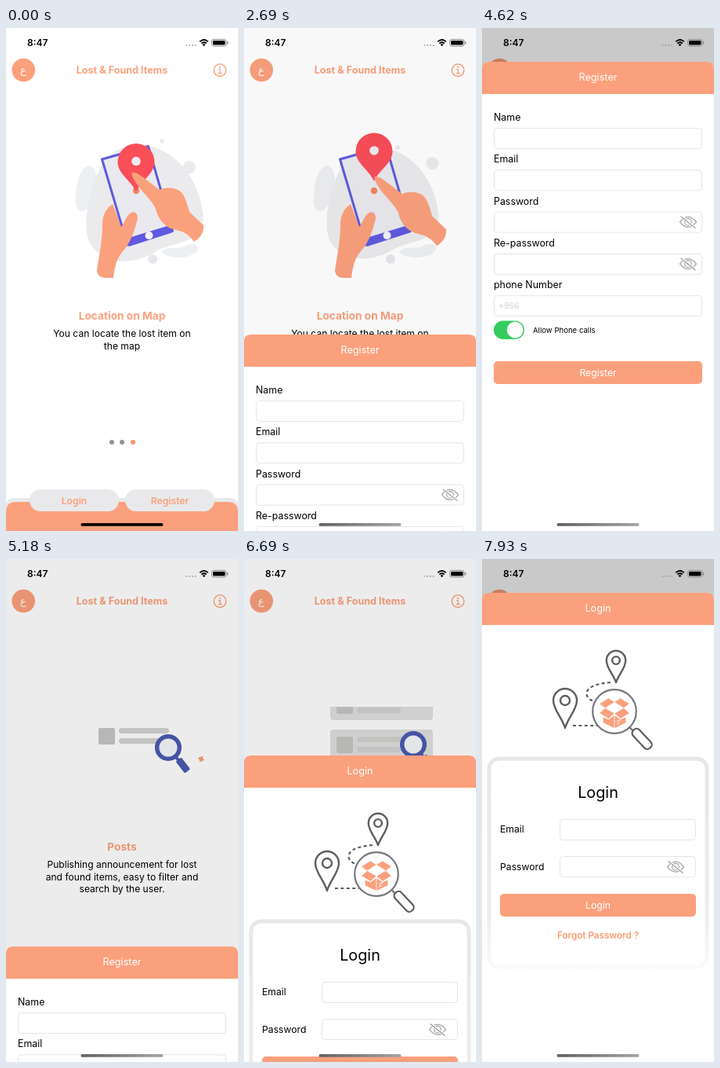
Recreate the animation shown at these times as an HTML page. Size 296 by 640 pixels, loop 8 s.

```html
<!DOCTYPE html>
<html lang="en">
<head>
<meta charset="utf-8">
<title>Lost &amp; Found Items</title>
<style>
html, body { margin: 0; width: 100%; height: 100%; overflow: hidden; background: #fff; }
svg { display: block; width: 296px; height: 640px; }
text { font-family: Inter, "Noto Sans", sans-serif; }
</style>
</head>
<body>
<svg id="stage" viewBox="0 0 296 640" xmlns="http://www.w3.org/2000/svg"></svg>
<script>
const LOOP = 8000, TOP = 43, TRAVEL = 597;
const ORANGE = '#fba07c', GREY = '#ebebed', LINE = '#e6e6e6', INK = '#5d5e62';
const stage = document.getElementById('stage');

// Drawing helpers
const attrs = o => Object.entries(o).map(([k, v]) => ` ${k}="${v}"`).join('');
const label = (s, x, y, size, fill = '#000', o = {}) =>
  `<text x="${x}" y="${y}" font-size="${size}" fill="${fill}"${attrs(o)}>${s}</text>`;
const centred = (s, x, y, size, fill, weight = 400) =>
  label(s, x, y, size, fill, { 'text-anchor': 'middle', 'font-weight': weight });
const box = (x, y, w, h, r, fill, o = {}) =>
  `<rect x="${x}" y="${y}" width="${w}" height="${h}" rx="${r}" fill="${fill}"${attrs(o)}/>`;
const disc = (x, y, r, fill, o = {}) => `<circle cx="${x}" cy="${y}" r="${r}" fill="${fill}"${attrs(o)}/>`;
const shape = (d, fill, o = {}) => `<path d="${d}" fill="${fill}"${attrs(o)}/>`;
const stroke = (d, color, width, o = {}) =>
  shape(d, 'none', { stroke: color, 'stroke-width': width, 'stroke-linecap': 'round', ...o });
const group = (id, body, o = {}) => `<g id="${id}"${attrs(o)}>${body}</g>`;
const field = (x, y, w) => box(x + .5, y + .5, w - 1, 26, 4, '#fff', { stroke: LINE });
const button = (s, x, y, w) => box(x, y, w, 29, 5, ORANGE) + centred(s, 148, y + 19, 12.2, '#fff');

const eye = (x, y) => `<g transform="translate(${x} ${y})">` +
  stroke('M-10.5 0Q0-13 10.5 0Q0 13-10.5 0Z', '#a2a2a2', 1.2) +
  disc(0, 0, 4.3, 'none', { stroke: '#a2a2a2', 'stroke-width': 1.2 }) +
  disc(0, 0, 1.6, '#a2a2a2') +
  stroke('M-8.5-7L9 7.5', '#fff', 3) + stroke('M-9-7L9 7.5', '#999', 1.2) + '</g>';

function statusBar() {
  const dots = [230.5, 234.3, 238, 241.7].map(x => disc(x, 22, 1, '#a5a5a8')).join('');
  const wifi = stroke('M247.2 17.4Q252.5 12.6 257.8 17.4M249.2 19.7Q252.5 16.8 255.8 19.7', '#000', 1.7,
    { 'stroke-linecap': 'butt' }) + shape('M252.5 23.2l-2-2.2q2-1.6 4 0z', '#000');
  const battery = box(262.5, 14.5, 18.5, 8.6, 2.6, 'none', { stroke: '#8b8b8d' }) +
    box(264, 16, 15.5, 5.6, 1.4, '#000') + box(282, 17, 1.3, 3.6, .6, '#8b8b8d');
  return label('8:47', 27, 23, 12, '#000', { 'font-weight': 600 }) + dots + wifi + battery;
}

function mapArt() {
  const blob = 'M110 205C120 168 138 149 168 149C212 148 246 190 251 234C256 276 218 270 192 284' +
    'C160 304 122 300 107 274C99 258 102 228 110 205Z';
  const phone = shape('M122.5 167L181.5 150.5L212.5 258L155 276Z', '#e9e9ef',
    { stroke: '#5f5adf', 'stroke-width': 3, 'stroke-linejoin': 'round' }) +
    shape('M153 268L209 251L213 260L157 278Z', '#5f5adf') + disc(182.5, 264, 5, '#f3f3f8');
  const leftHand = shape('M136 224C126 231 123 240 123 250C123 272 118 294 116 309Q117 318 128 318L137 318' +
    'C139 302 141 294 149 284C160 273 165 254 168 242C168 234 162 232 157 237C152 242 150 250 147 253Z', ORANGE);
  const pin = shape('M0 38C-6 24-23.5 15-23.5 0A23.5 23.5 0 0 1 23.5 0C23.5 15 6 24 0 38Z', '#fa4e59') +
    disc(0, -1, 5.8, '#ecebee');
  const rightHand = shape('M160.5 184C166 183 170 187 175 190L196 206C202 203 210 203 217 205' +
    'C227 208 230 220 234 234L252 251Q253 264 240 272C234 264 228 259 217 257C204 255 194 244 191 230' +
    'C188 223 182 217 176 210C170 203 160 192 160.5 184Z', ORANGE);
  return shape('M107 175C92 176 88 205 89 222C91 240 104 234 110 221C117 204 119 178 107 175Z', '#edf0f3') +
    shape('M198 285C205 275 220 284 230 276C239 274 246 274 245 282C239 294 207 295 198 285Z', '#edf0f3') +
    group('blob', shape(blob, GREY)) + disc(187, 294, 6, '#e6e7eb') +
    group('bigDot', disc(234, 177, 8, GREY)) + group('smallDot', disc(199, 144, 3, GREY)) +
    phone + leftHand + disc(166, 207, 4.2, '#f4865f') + group('pin', pin) + group('hand', rightHand);
}

function postCard(i) {
  return group('card' + i,
    box(110, 0, 131, 38, 4, '#e0e0e0', { class: 'plate' }) + box(118, 9, 21, 21, 2, '#c6c6c5') +
    box(144, 9, 64, 7, 3.5, '#d3d4d1', { class: 'bar' }) + box(144, 22, 56, 7, 3.5, '#d3d4d1'));
}

function postsArt() {
  const spark = id => group(id, box(-4, -1.6, 8, 3.2, .5, ORANGE) + box(-1.6, -4, 3.2, 8, .5, ORANGE));
  const lens = stroke('M9 11L13 16', '#4a5bb0', 4) +
    box(-4.5, 0, 9, 19, 2, '#4a5bb0', { transform: 'translate(13 15) rotate(-38)' }) +
    disc(0, 0, 14.3, '#f6f7fb', { stroke: '#4a5bb0', 'stroke-width': 5.5 });
  return `<g clip-path="url(#listClip)">${[0, 1, 2].map(postCard).join('')}</g>` +
    group('lens', lens) + spark('sparkR') + spark('sparkL');
}

const pageText = (title, lines) => centred(title, 148, 371, 13.7, ORANGE, 700) +
  lines.map((s, i) => centred(s, 148, 393 + i * 15.7, 12.1, '#000')).join('');

const pager = active => [135, 148, 162].map((x, i) =>
  disc(x, 527, 3, i === active ? '#fb9468' : '#929296')).join('');

function home() {
  const pill = (s, x) => box(x, 587, 114, 28, 14, '#e9e9eb') + centred(s, x + 57, 605.5, 12.2, ORANGE, 600);
  return box(0, 0, 296, 640, 0, '#fff') + disc(22.3, 53.5, 14.8, ORANGE) +
    label('ع', 22, 58, 13, '#fff', { 'text-anchor': 'middle', style: 'font-family:"DejaVu Sans",sans-serif' }) +
    centred('Lost &amp; Found Items', 148, 58, 12.6, ORANGE, 700) +
    disc(273, 53.7, 7.8, 'none', { stroke: ORANGE, 'stroke-width': 1.4 }) +
    disc(272.8, 50, 1.1, ORANGE) + stroke('M271.3 52.8H273.3V57.4M271 57.6H275.4', ORANGE, 1.3) +
    group('mapPage', mapArt() + pageText('Location on Map',
      ['You can locate the lost item on', 'the map']) + pager(2)) +
    group('postsPage', postsArt() + pageText('Posts', ['Publishing announcement for lost',
      'and found items, easy to filter and', 'search by the user.']) + pager(0)) +
    shape('M0 608Q0 598 10 598H286Q296 598 296 608V640H0Z', '#e8e8eb') +
    shape('M0 616Q0 603 13 603H283Q296 603 296 616V640H0Z', ORANGE) +
    pill('Login', 30) + pill('Register', 152);
}

const sheet = (id, title, body) => group(id, shape('', '#fff', { class: 'body' }) +
  shape('M0 41V9Q0 0 9 0H287Q296 0 296 9V41Z', ORANGE) + centred(title, 148, 24, 12.7, '#fff') + body);

function registerForm() {
  const rows = ['Name', 'Email', 'Password', 'Re-password', 'phone Number'].map((s, i) => {
    const y = 84 + i * 53.3;
    return label(s, 15, y - 9, 12.4) + field(15, y, 266) + (i === 2 || i === 3 ? eye(263, y + 13.3) : '');
  }).join('');
  return rows + label('+966', 21, 314, 10.5, '#d6d6d8') +
    box(15, 329.5, 39, 23.5, 11.75, '#36cb60') + disc(42.2, 341.2, 10.4, '#fff') +
    label('Allow Phone calls', 65, 344.6, 9.6) + button('Register', 15, 381, 266);
}

function loginArt() {
  const marker = (x, y, r, tip) => stroke(
    `M${x} ${y + tip}C${x - 4} ${y + tip * .6} ${x - r} ${y + r * .8} ${x - r} ${y}` +
    `A${r} ${r} 0 0 1 ${x + r} ${y}C${x + r} ${y + r * .8} ${x + 4} ${y + tip * .6} ${x} ${y + tip}Z`,
    INK, 2.4, { 'stroke-linejoin': 'round' }) + disc(x, y, r * .4, 'none', { stroke: INK, 'stroke-width': 2.4 });
  const half = shape('M-17-10L-7-16L-.8-12L-11-5.5ZM-17 1L-11-4.5L-.8 1.5L-7 7ZM-13 6.5L-7 9L-.8 4.5V18L-13 12Z',
    ORANGE, { stroke: ORANGE, 'stroke-width': .7 });
  const dash = { 'stroke-dasharray': '4 3.4', 'stroke-linecap': 'butt' };
  return marker(106, 137, 15, 35) + marker(171, 86, 12.2, 28) +
    stroke('M116 169H159', INK, 2.2, dash) +
    stroke('M164 114C142 116 131 122 134 131C137 138 146 139 153 140', INK, 2.2, dash) +
    disc(169, 151, 27.8, '#fff', { stroke: '#77787b', 'stroke-width': 2.2 }) +
    stroke('M188.5 171L193 176', '#77787b', 2.4) +
    box(-5.5, 0, 11, 31, 5, '#fff',
      { transform: 'translate(193.5 174.5) rotate(-43)', stroke: INK, 'stroke-width': 2.2 }) +
    `<g transform="translate(169 152) scale(1.08)">${half}<g transform="scale(-1 1)">${half}</g>` +
    stroke('M3 11L7 9.2M3 14L6 12.6', '#fff', 1) + '</g>';
}

function loginForm() {
  return loginArt() + box(9, 211, 278, 265, 13, '#fff', { stroke: 'url(#rim)', 'stroke-width': 5 }) +
    centred('Login', 148, 260.5, 19.8, '#000') +
    label('Email', 23, 305, 12.2) + field(99, 288, 174) +
    label('Password', 23, 353, 12.2) + field(99, 335, 174) + eye(247, 348.7) +
    button('Login', 23, 383, 250) + centred('Forgot Password ?', 148, 439.5, 11.7, '#fb9a74', 600);
}

stage.innerHTML = `<defs>
  <clipPath id="listClip"><rect x="100" y="188" width="150" height="83"/></clipPath>
  <linearGradient id="rim" x2="0" y2="1"><stop stop-color="#e7e7e8"/><stop offset=".75" stop-color="#ededee"/>
    <stop offset="1" stop-color="#fafafa"/></linearGradient>
  <linearGradient id="bar"><stop stop-color="#626262"/><stop offset="1" stop-color="#a4a4a4"/></linearGradient>
  </defs>` + home() + box(0, 0, 296, 640, 0, '#000', { id: 'dim' }) +
  sheet('register', 'Register', registerForm()) + sheet('login', 'Login', loginForm()) +
  statusBar() + box(95.5, 630, 105, 3.8, 1.9, '#000', { id: 'homeBar' });

// Motion
const $ = id => document.getElementById(id);
const clamp = v => Math.max(0, Math.min(1, v));
const smooth = v => { v = clamp(v); return v * v * (3 - 2 * v); };
const move = (id, x, y, extra = '') => $(id).setAttribute('transform', `translate(${x} ${y}) ${extra}`);
const show = (id, on) => $(id).setAttribute('visibility', on ? 'visible' : 'hidden');

const DISMISS = [[4680, 43], [4760, 106], [4910, 230], [5040, 370], [5180, 492], [5320, 590], [5480, 640]];

function track(steps, t) {
  const i = steps.findIndex(s => s[0] > t);
  if (i < 0) return steps[steps.length - 1][1];
  if (i === 0) return steps[0][1];
  const [t0, a] = steps[i - 1], [t1, b] = steps[i];
  return a + (b - a) * (t - t0) / (t1 - t0);
}

// Critically damped rise from the bottom edge
function rise(t, start) {
  const x = Math.max(0, t - start) * .011;
  const off = TRAVEL * (1 + x) * Math.exp(-x);
  return TOP + (off < .4 ? 0 : off);
}

function placeSheet(id, y) {
  const r = Math.min(45, (y - TOP) * 7);
  $(id).querySelector('.body').setAttribute('d',
    `M0 9Q0 0 9 0H287Q296 0 296 9V${TRAVEL - r}A${r} ${r} 0 0 1 ${296 - r} ${TRAVEL}H${r}A${r} ${r} 0 0 1 0 ${TRAVEL - r}Z`);
  move(id, 0, Math.round(y));
  show(id, y < 639.9);
}

function drawMap(t) {
  const k = 1 - Math.cos(t / 5200 * 2 * Math.PI);
  const s = 1 - .022 * k;
  move('blob', 177 * (1 - s), 223 * (1 - s), `scale(${s})`);
  move('bigDot', 3.2 * k, -2.4 * k);
  move('smallDot', -1.6 * k, 4 * k);
  move('pin', 166, 170.5 - 6.8 * k);
  move('hand', 3 * k, 2.6 * k);
}

function drawPosts(t) {
  const grow = smooth((t - 5180) / 450);
  const scroll = 39 * smooth((t - 5600) / 1090) + 61 * smooth((t - 6750) / 900);
  for (let i = 0; i < 3; i++) {
    const card = $('card' + i);
    move('card' + i, 0, 206 + 50 * i - scroll);
    card.setAttribute('opacity', i ? grow : 1);
    card.querySelector('.plate').setAttribute('opacity', grow);
    card.querySelector('.bar').setAttribute('width', 64 + 13 * grow);
  }
  const u = clamp((t - 5180) / 1510), swing = Math.sin(u * Math.PI * 2);
  move('lens', 207 + 9 * u - 8 * swing, 240 - 4 * u + 4 * swing);
  const pulse = .8 + .1 * Math.cos((t - 5180) / 200);
  move('sparkR', 249, 254.5, `rotate(${20 + (t - 5180) * .06}) scale(${pulse})`);
  move('sparkL', 82, 257, `rotate(30) scale(${Math.sin(clamp((t - 5600) / 670) * Math.PI)})`);
}

function render(t) {
  const regY = t < 4680 ? rise(t, 2561) : track(DISMISS, t);
  const logY = rise(t, 6488);
  const posts = t > 3300;
  show('mapPage', !posts);
  show('postsPage', posts);
  if (posts) drawPosts(t); else drawMap(t);
  placeSheet('register', regY);
  placeSheet('login', logY);

  const top = Math.min(regY, logY);
  const cover = clamp((640 - top) / TRAVEL);
  const leaving = t >= 4680 && t < 5480;
  $('dim').setAttribute('opacity', .21 * Math.pow(cover, leaving ? .74 : 2.4));
  $('homeBar').setAttribute('fill', top < 628 ? 'url(#bar)' : '#000');
}

const begin = performance.now();
function tick() {
  render((performance.now() - begin) % LOOP);
  requestAnimationFrame(tick);
}
tick();
</script>
</body>
</html>
```
